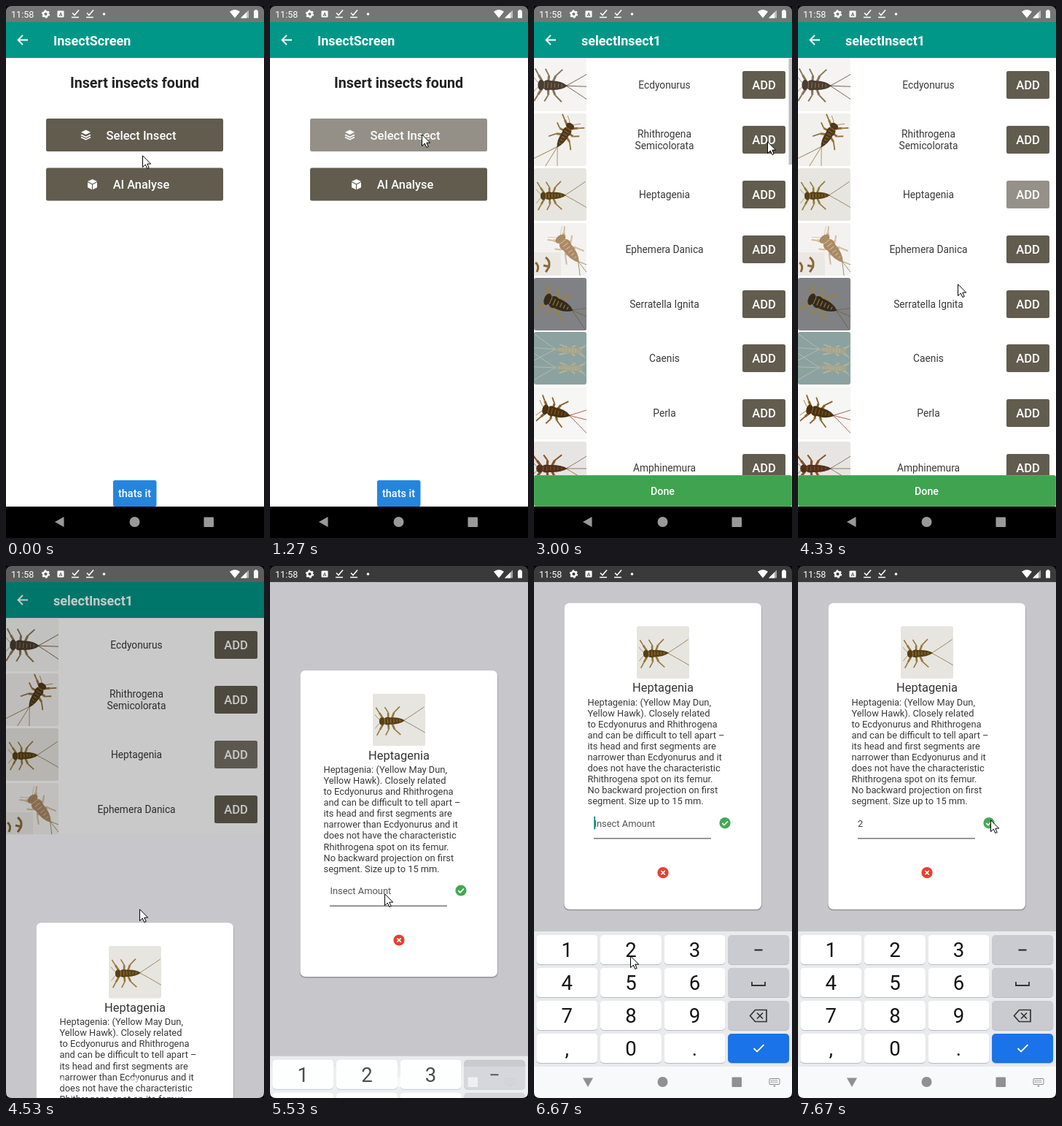
Recreate the animation shown at these times as an HTML page. Size 354 by 728 pixels, loop 8 s.

```html
<!DOCTYPE html>
<html lang="en">
<head>
<meta charset="utf-8">
<title>Insect counter</title>
<style>
  html, body { margin: 0; width: 100%; height: 100%; overflow: hidden; background: #000; }
  svg { display: block; width: 354px; height: 728px; font-family: Roboto, sans-serif; }
</style>
</head>
<body>
<svg id="stage" viewBox="0 0 354 728"></svg>
<script>
const LOOP = 8000, TOP = 22, PAGE = 663, PITCH = 74.88;
const BROWN = '#625c4f', TEAL = '#009688';

// Drawing helpers
const rect = (x, y, w, h, fill, more = '') =>
  `<rect x="${x}" y="${y}" width="${w}" height="${h}" fill="${fill}" ${more}/>`;
const text = (x, y, s, size, fill, more = '') =>
  `<text x="${x}" y="${y}" font-size="${size}" fill="${fill}" ${more}>${s}</text>`;
const line = (d, color, width = 1, more = '') =>
  `<path d="${d}" fill="none" stroke="${color}" stroke-width="${width}" ${more}/>`;
const shape = (d, fill, more = '') => `<path d="${d}" fill="${fill}" ${more}/>`;
const group = (id, body, more = '') => `<g id="${id}" ${more}>${body}</g>`;
const MID = 'text-anchor="middle"', MEDIUM = 'font-weight="500"', BOLD = 'font-weight="700"';

const header = title =>
  rect(0, 71, 354, 1, '#000', 'opacity=".08"') + rect(0, TOP, 354, 49, TEAL) +
  line('M30 46.5H17M23 40l-6.5 6.5 6.5 6.5', '#fff', 1.8) +
  text(65, 53.5, title, 18, '#fff', BOLD);

// Insects: head at the origin, body along +x, reach scales the legs
function bug(x, y, angle, len, body, leg, tail, { tails = 3, reach = 1, width = 1 } = {}) {
  const u = f => (f * len).toFixed(1);
  let out = '';
  for (const side of [-1, 1]) {
    const s = side * reach;
    [[.14, -.08, -.22], [.28, .3, .16], [.4, .55, .8]].forEach(([from, knee, foot]) => {
      out += line(`M${u(from)} 0L${u(knee)} ${u(s * .36)}`, leg, u(.085)) +
        line(`M${u(knee)} ${u(s * .36)}L${u(foot)} ${u(s * .6)}`, leg, u(.05));
    });
    out += line(`M0 0Q${u(-.15)} ${u(side * .12)} ${u(-.28)} ${u(side * .3)}`, leg, .7);
  }
  for (let i = 0; i < tails; i++) {
    const spread = i / (tails - 1) - .5;
    out += line(`M${u(.95)} 0Q${u(1.3)} ${u(spread * .4)} ${u(1.85)} ${u(spread * 1.1)}`, tail, .9);
  }
  const w = .17 * width;
  out += `<ellipse cx="${u(.26)}" rx="${u(.19)}" ry="${u(w)}" fill="${body}"/>` +
    `<ellipse cx="${u(.02)}" rx="${u(.12)}" ry="${u(w)}" fill="${body}"/>` +
    shape(`M${u(.3)} ${u(-w * .85)}Q${u(.75)} ${u(-w * 1.05)} ${u(1)} 0Q${u(.75)} ${u(w * 1.05)} ${u(.3)} ${u(w * .85)}Z`, body);
  for (let k = 0; k < 6; k++) {
    const half = w * (.62 - k * .07);
    out += line(`M${u(.14 + k * .13)} ${u(-half)}V${u(half)}`, leg, 1);
  }
  return `<g transform="translate(${x} ${y}) rotate(${angle})">${out}</g>`;
}

const pale = { reach: .35, width: .8 };
const insects = [
  ['Ecdyonurus', '#f5f4f2', bug(9, 36, 2, 37, '#4b3d30', '#8a7558', '#6d5640', { width: 1.15 })],
  ['Rhithrogena|Semicolorata', '#f2f0ed', bug(50, 17, 122, 35, '#50391a', '#92713c', '#a68d63', { reach: .85 })],
  ['Heptagenia', '#e7e5e0', bug(12, 38, -2, 32, '#594116', '#95783d', '#92805a', { tails: 2 })],
  ['Ephemera Danica', '#f3f2f0',
    rect(0, 40, 37, 32, '#ebe8e3') + line('M2 54q6 4 2 13M16 47q10 8 0 20M13 58l9 2', '#8a6837', 3) +
    bug(36, 21, 52, 42, '#ab8a66', '#d4bd9c', '#a58d6d', { reach: .6, width: 1.1 })],
  ['Serratella Ignita', '#808184', bug(18, 29, 24, 39, '#352b1b', '#9a8048', '#73654a', { reach: .85, width: 1.25 })],
  ['Caenis', '#8ba2a1',
    bug(62, 26, 184, 34, '#a8a58c', '#b9b59c', '#b9bda8', pale) + bug(62, 50, 182, 34, '#a8a58c', '#b9b59c', '#b9bda8', pale)],
  ['Perla', '#f6f6f5', bug(15, 31, 14, 36, '#4a3110', '#8b6125', '#b0604a', { reach: .85, width: 1.15 })],
  ['Amphinemura', '#e6e5e4', bug(7, 37, 0, 39, '#54301b', '#83522f', '#8b6b55', { reach: .8, width: .85 })]
];
const photo = (i, x, y) =>
  `<svg x="${x}" y="${y}" width="72" height="72"><g clip-path="url(#thumb)">${rect(0, 0, 72, 72, insects[i][1])}${insects[i][2]}</g></svg>`;
const rowMid = i => Math.round(108 + i * PITCH);

function row([name], i) {
  const mid = rowMid(i), lines = name.split('|');
  const label = lines.map((s, k) =>
    text(179, mid + 5 + (k - (lines.length - 1) / 2) * 16, s, 13.75, '#383838', MID)).join('');
  return label + group('add' + i,
    rect(286, mid - 19, 59, 38, BROWN, 'rx="2.5"') + text(315.5, mid + 6, 'ADD', 16.6, '#fff', MID + MEDIUM));
}

const homePage = rect(0, TOP, 354, PAGE, '#fff') + header('InsectScreen') +
  text(176.5, 111.5, 'Insert insects found', 19.7, '#222', MID + BOLD) +
  group('select', rect(55, 154, 243, 45, BROWN, 'rx="2.5"') +
    shape('M109.5 169.5l6.5 3.2-6.5 3.2-6.5-3.2z', '#fff') +
    line('M103 176.3l6.5 3.2 6.5-3.2M103 179.5l6.5 3.2 6.5-3.2', '#fff', 1.6) +
    text(185.5, 182.5, 'Select Insect', 16.6, '#fff', MID + MEDIUM)) +
  rect(55, 221.5, 243, 45, BROWN, 'rx="2.5"') +
  shape('M118.5 237l6.5 3-6.5 3.2-6.5-3.2zM112 241.2l5.9 3v7l-5.9-3zM125 241.2l-5.9 3v7l5.9-3z', '#fff') +
  text(185.5, 250, 'AI Analyse', 16.4, '#fff', MID + MEDIUM) +
  rect(147, 649, 59.5, 36, '#2585dd', 'rx="2.5"') +
  text(176.5, 672, 'thats it', 14.4, '#fff', MID + MEDIUM);

const listPage = rect(0, TOP, 354, PAGE, '#fff') +
  group('rows', insects.map(row).join('') + group('photos', insects.map((_, i) => photo(i, 0, rowMid(i) - 36)).join('')),
    'clip-path="url(#list)"') +
  rect(349.5, 72, 4.5, 145, '#bebebe', 'id="scrollbar"') + header('selectInsect1') +
  rect(.5, 642.5, 353, 42, '#40a350', 'rx="2" stroke="#52b062"') +
  text(176.5, 669, 'Done', 14.2, '#fff', MID + MEDIUM);

const about = ['Heptagenia: (Yellow May Dun,', 'Yellow Hawk). Closely related', 'to Ecdyonurus and Rhithrogena',
  'and can be difficult to tell apart –', 'its head and first segments are', 'narrower than Ecdyonurus and it',
  'does not have the characteristic', 'Rhithrogena spot on its femur.', 'No backward projection on first',
  'segment. Size up to 15 mm.'];
const badge = (x, y, color, mark) =>
  `<circle cx="${x}" cy="${y}" r="7.6" fill="${color}"/>` + line(`M${x} ${y}${mark}`, '#fff', 1.7);
const card = rect(41, 145, 272, 419, '#000', 'rx="7" opacity=".1"') + rect(41, 144, 271.5, 419.5, '#000', 'rx="7" opacity=".13"') +
  rect(41.5, 143, 270.5, 419, '#fff', 'rx="7"') + photo(2, 141, 174.5) +
  text(177, 264.5, 'Heptagenia', 16.45, '#333', MID) +
  about.map((s, i) => text(73.5, 283 + i * 15.08, s, 12.85, '#383838')).join('') +
  text(82.5, 449, 'Insect Amount', 12.9, '#555', 'id="hint"') + text(82, 449, '2', 12.9, '#444', 'id="amount"') +
  rect(82, 464.6, 161, 1.1, '#444') + rect(82.3, 435, 1.8, 17.5, '#00897b', 'id="caret"') +
  badge(262, 444, '#43a853', 'm-3.8 .2l2.7 2.7 5-5.2') + badge(177, 512, '#e5402f', 'm-2.7-2.7l5.4 5.4m0-5.4l-5.4 5.4');

const keys = ['1', '2', '3', '', '4', '5', '6', '', '7', '8', '9', '', ',', '0', '.', ''].map((s, i) => {
  const col = i % 4, x = 3.3 + col * 87.6, y = 505 + (i >> 2) * 45;
  const fill = i === 15 ? '#1a73e8' : col === 3 ? '#c9cbd1' : '#fff';
  return rect(x, y + 1, 84, 40, '#b9bcc2', 'rx="5"') + rect(x, y, 84, 40, fill, `rx="5" id="key${i}"`) +
    text(x + 42, y + 30, s, 27.5, '#111', MID);
}).join('');
const keyboard = rect(0, 500, 354, 185, '#e8eaed') + keys +
  line('M302.5 525.5h11', '#222', 2) + line('M299 569v5h18v-5', '#333', 1.8) +
  line('M296.5 615.5l7-8h15.5v16h-15.5zM306 611.5l8 8m0-8l-8 8', '#333', 1.7) +
  line('M301.5 660l4.5 4.5 9.5-9.5', '#fff', 1.8);

const tick = x => line(`M${x - 4} 9.5l3 3 6-7M${x - 5} 15.5h10`, '#fff', 1.6);
const statusIcons = text(7, 15.5, '11:58', 12.6, '#fff') +
  '<circle cx="54.5" cy="11" r="3.3" fill="none" stroke="#fff" stroke-width="2.4"/>' +
  '<circle cx="54.5" cy="11" r="4.9" fill="none" stroke="#fff" stroke-width="1.6" stroke-dasharray="2.57"/>' +
  rect(70.5, 6.5, 9, 9, '#fff', 'rx="1"') + text(75, 13.8, 'A', 7.5, '#666', MID + BOLD) +
  tick(95) + tick(115) + '<circle cx="134.5" cy="11" r="1.8" fill="#fff"/>' +
  shape('M307 7.8q7-5.5 14 0l-7 8.7z', '#fff') + shape('M333 5.5v11h-11z', '#fff', 'opacity=".55"') +
  shape('M330 8.5v8h-8z', '#fff') + shape('M340 6.5h1.5v-1.5h3v1.5h1.5v10h-6z', '#fff');
const navIcons = '<path id="back" d="M67 706l12.5-7v14z"/><circle cx="176.5" cy="706" r="7"/>' +
  '<rect x="271.5" y="699.5" width="13.5" height="13.5" rx="1"/>';
const keyIcon = rect(323, 701.5, 14, 8, 'none', 'stroke="#888" rx="1"') +
  line('M325 704h10M325 706.5h10', '#888', 1.3, 'stroke-dasharray="1.3 1.2"') + shape('M328 711h4l-2 2z', '#888');

document.getElementById('stage').innerHTML =
  `<defs><clipPath id="thumb">${rect(0, 0, 72, 72, '#000', 'rx="3"')}</clipPath>
   <clipPath id="list">${rect(0, 71, 354, 573, '#000')}</clipPath>
   <clipPath id="reveal">${rect(0, TOP, 354, PAGE, '#000', 'id="revealBox"')}</clipPath></defs>` +
  rect(0, 0, 354, 728, '#fff') + group('home', homePage) + rect(0, 0, 354, 728, '#000', 'id="shade"') +
  group('next', group('nextPage', listPage), 'clip-path="url(#reveal)"') +
  rect(0, 0, 354, TOP, '#757575') + rect(0, 685, 354, 43, '#000') +
  rect(0, 0, 354, 728, '#000', 'id="dim"') +
  group('modal', rect(0, TOP, 354, PAGE, '#c7c6cb') + rect(0, 685, 354, 43, '#000') + group('card', card)) +
  group('keyboard', keyboard) + rect(0, 685, 354, 43, '#f8f9fa', 'id="lightNav"') +
  group('nav', navIcons) + group('keyIcon', keyIcon) + statusIcons +
  shape('M0 0H354V728H0ZM8 0Q0 0 0 8V720Q0 728 8 728H346Q354 728 354 720V8Q354 0 346 0Z', '#000', 'fill-rule="evenodd"') +
  group('cursor', shape('M.5 .8V16.6L4.3 13.1 6.8 18.5 9.2 17.5 6.8 12.1H11.7Z', '#fff', 'stroke="#000"'));

// Motion helpers
const $ = {};
document.querySelectorAll('[id]').forEach(el => $[el.id] = el);
const progress = (t, from, to) => Math.min(1, Math.max(0, (t - from) / (to - from)));
const smooth = p => (1 - Math.cos(Math.PI * p)) / 2;
const easeOut = p => 1 - (1 - p) ** 2;
const fade = (el, v) => el.setAttribute('opacity', v);
const show = (el, on) => el.setAttribute('visibility', on ? 'visible' : 'hidden');
const moveY = (el, y) => el.setAttribute('transform', `translate(0 ${y})`);

// cubic-bezier(.35, .45, 0, 1)
function revealEase(x) {
  let lo = 0, hi = 1, s = x;
  for (let i = 0; i < 24; i++) {
    s = (lo + hi) / 2;
    if (1.05 * s * (1 - s) ** 2 + s ** 3 < x) lo = s; else hi = s;
  }
  return 1.35 * s * (1 - s) ** 2 + 3 * s * s * (1 - s) + s ** 3;
}

const cursorPath = [[30, 187, 204], [200, 208, 175], [1930, 208, 175], [2380, 320, 185], [3190, 320, 185],
  [3470, 313, 250], [4150, 313, 250], [4330, 219, 380], [4530, 183, 469], [4720, 161, 464], [5000, 157, 449],
  [5069, 157, 449], [5070, 157, 448], [6050, 157, 448], [6520, 132, 533], [7130, 132, 533], [7660, 264, 347]];
function cursorAt(t) {
  const i = cursorPath.findIndex(p => p[0] > t);
  if (i === 0) return cursorPath[0].slice(1);
  if (i < 0) return cursorPath.at(-1).slice(1);
  const [a, b] = [cursorPath[i - 1], cursorPath[i]], p = progress(t, a[0], b[0]);
  return [1, 2].map(k => Math.round(a[k] + (b[k] - a[k]) * p));
}

function render(t) {
  const open = revealEase(progress(t, 1510, 1935)), left = PAGE * (1 - open);
  moveY($.home, -.02 * PAGE * open);
  fade($.shade, .1 * Math.min(1, open / .36));
  fade($.select, t >= 1260 && t < 1530 ? .68 : 1);
  show($.next, open > 0);
  $.revealBox.setAttribute('y', TOP + left);
  moveY($.nextPage, .041 * left);

  $.rows.style.display = t >= 2390 ? '' : 'none';
  fade($.photos, progress(t, 2390, 2530));
  fade($.scrollbar, t < 2390 ? 0 : 1 - progress(t, 2990, 3250));
  fade($.add2, 1 - .33 * progress(t, 3700, 3930) + .33 * progress(t, 4340, 4650));

  const slide = progress(t, 4342, 4708);
  fade($.dim, .5 * slide ** 1.3);
  moveY($.modal, 728 * (1 - smooth(slide)));
  show($.modal, slide > 0);
  moveY($.card, -92.3 * easeOut(progress(t, 5940, 6220)));

  const rise = easeOut(progress(t, 5500, 5730));
  moveY($.keyboard, 228 * (1 - rise));
  show($.keyboard, rise > 0);
  fade($.lightNav, rise);
  const tone = progress(t, 5930, 6200);
  $.nav.setAttribute('fill', rise < .5 ? 'rgba(255,255,255,.6)' : `rgba(0,0,0,${.22 + .2 * tone})`);
  $.back.setAttribute('transform', `rotate(${-90 * tone} 74 706)`);
  fade($.keyIcon, rise * (.35 + .65 * tone));

  const typed = t >= 6990, since = t - (typed ? 6930 : 5660);
  show($.hint, !typed);
  show($.amount, typed);
  show($.caret, slide === 1 && since >= 0 && since % 1000 < 500);
  $.caret.setAttribute('x', typed ? 90 : 82.3);
  $.key1.setAttribute('fill', t >= 6920 && t < 7070 ? '#dcdee2' : '#fff');

  $.cursor.setAttribute('transform', `translate(${cursorAt(t)})`);
}

const start = performance.now();
function tickFrame() {
  render((performance.now() - start) % LOOP);
  requestAnimationFrame(tickFrame);
}
render(0);
requestAnimationFrame(tickFrame);
</script>
</body>
</html>
```
